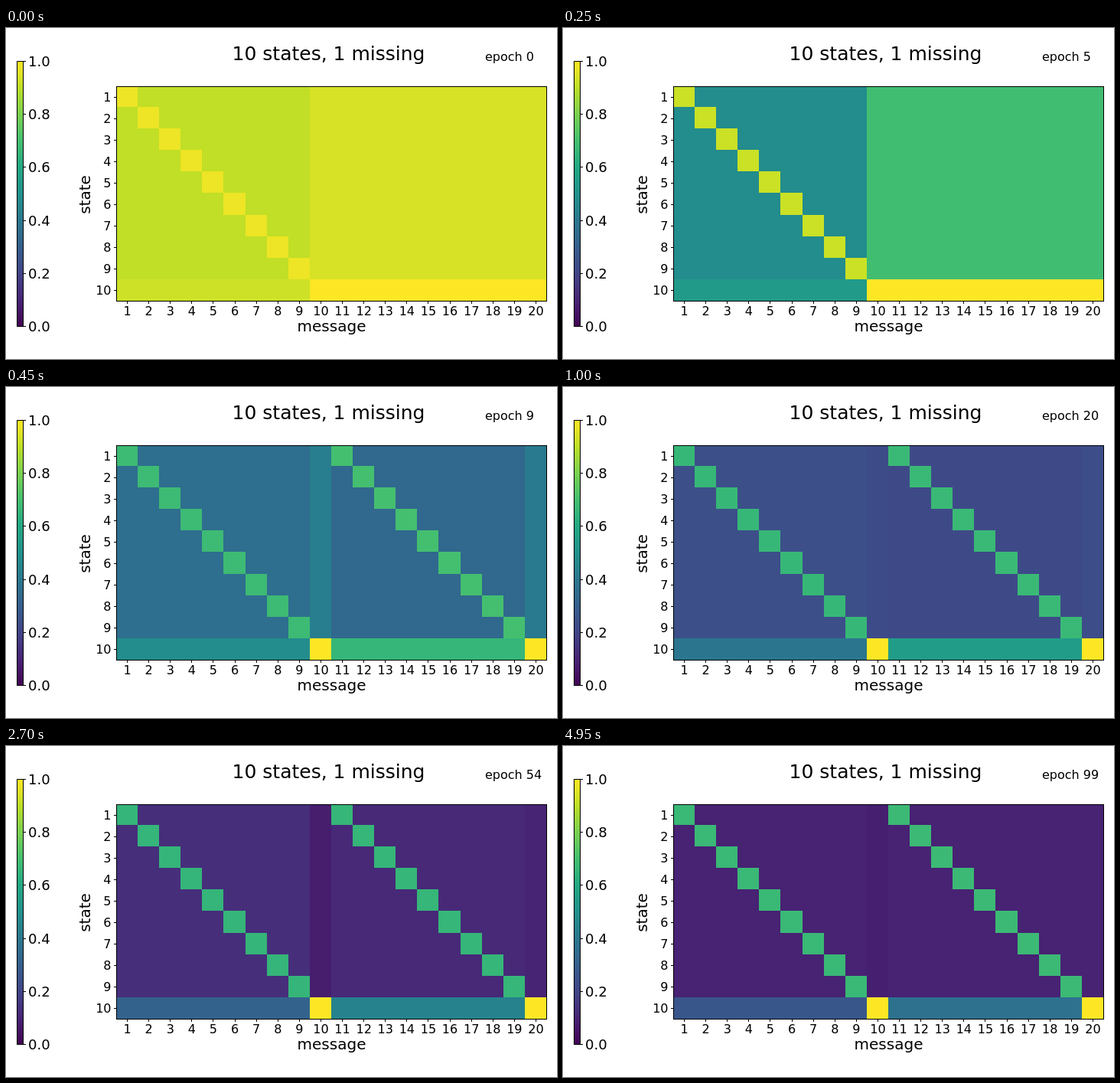
Write an HTML page with a canvas that moves like this. It is 720x432 px and loops after 5000 ms.

```html
<!DOCTYPE html>
<html lang="en">
<head>
<meta charset="utf-8">
<title>10 states, 1 missing</title>
<style>
  html, body { margin: 0; width: 100%; height: 100%; overflow: hidden; background: #fff; }
  canvas { display: block; width: 720px; height: 432px; }
</style>
</head>
<body>
<canvas id="stage" width="720" height="432"></canvas>
<script>
const ctx = document.getElementById('stage').getContext('2d');
const LOOP = 5000, STEP = 50;
const ROWS = 10, COLS = 20, CELL = 28.1;
const BOX = { left: 144, top: 76, right: 706, bottom: 356 };
const BAR = { left: 14, top: 43, right: 22, bottom: 389 };

const VIRIDIS = ['440154', '482475', '414487', '355f8d', '2a788e', '21918c',
  '22a884', '44bf70', '7ad151', 'bddf26', 'fde725']
  .map(hex => [0, 2, 4].map(i => parseInt(hex.slice(i, i + 2), 16)));

// Value of each region of the matrix at these epochs
const EPOCHS = [0, 3, 5, 9, 37, 71, 99];
const CURVES = {
  leftRest:     [.905, .65, .48, .36, .148, .118, .094],
  leftDiagonal: [.975, .94, .92, .68, .65, .66, .67],
  leftBottom:   [.925, .69, .54, .485, .318, .315, .265],
  column10:     [.94, .78, .69, .425, .075, .083, .086],
  column20:     [.94, .78, .69, .41, .10, .102, .093],
  rightRest:    [.94, .78, .69, .335, .135, .10, .094],
  rightDiagonal:[.94, .78, .69, .70, .65, .665, .675],
  rightBottom:  [1, 1, 1, .66, .46, .425, .37],
  corner:       [1, 1, 1, 1, 1, 1, 1]
};

function color(value) {
  const p = Math.min(Math.max(value, 0), 1) * 10;
  const i = Math.min(Math.floor(p), 9);
  const rgb = VIRIDIS[i].map((c, k) => Math.round(c + (VIRIDIS[i + 1][k] - c) * (p - i)));
  return `rgb(${rgb})`;
}

// Linear during the fast start, logarithmic in the slow tail
function sample(curve, epoch) {
  let i = 0;
  while (i < EPOCHS.length - 2 && epoch >= EPOCHS[i + 1]) i++;
  const scale = EPOCHS[i] >= 9 ? Math.log : x => x;
  const from = scale(EPOCHS[i]), to = scale(EPOCHS[i + 1]);
  const k = (scale(epoch) - from) / (to - from);
  return curve[i] + (curve[i + 1] - curve[i]) * k;
}

function region(row, col) {
  const bottom = row === ROWS - 1;
  if (col === 9 || col === 19) return bottom ? 'corner' : 'column' + (col + 1);
  const side = col < 9 ? 'left' : 'right';
  if (bottom) return side + 'Bottom';
  return side + (col % 10 === row ? 'Diagonal' : 'Rest');
}

function text(str, x, y, size, align = 'left') {
  ctx.font = `${size}px "DejaVu Sans", sans-serif`;
  ctx.textAlign = align;
  ctx.fillText(str, x, y);
}

function frame({ left, top, right, bottom }) {
  ctx.strokeRect(left + .5, top + .5, right - left, bottom - top);
}

function drawMatrix(epoch) {
  const fills = {};
  for (const name in CURVES) fills[name] = color(sample(CURVES[name], epoch));
  const edgeX = i => Math.round(143.9 + CELL * i);
  const edgeY = i => Math.round(74.9 + CELL * i);
  for (let row = 0; row < ROWS; row++) {
    for (let col = 0; col < COLS; col++) {
      const x = edgeX(col), y = Math.max(edgeY(row), BOX.top);
      ctx.fillStyle = fills[region(row, col)];
      ctx.fillRect(x, y, edgeX(col + 1) - x, edgeY(row + 1) - y);
    }
  }
}

function drawAxes() {
  ctx.fillStyle = ctx.strokeStyle = '#000';
  ctx.lineWidth = 1;
  frame(BOX);
  for (let col = 0; col < COLS; col++) {
    const x = 144.5 + CELL * (col + .5);
    ctx.fillRect(Math.floor(x), BOX.bottom + 1, 1, 3);
    text(col + 1, x, 375, 16, 'center');
  }
  for (let row = 0; row < ROWS; row++) {
    const y = Math.floor(76.4 + 28 * (row + .5));
    ctx.fillRect(BOX.left - 3, y, 3, 1);
    text(row + 1, 137.5, y + 6, 16, 'right');
  }
  text('message', 425.5, 396, 20, 'center');
  ctx.save();
  ctx.translate(110, 217.5);
  ctx.rotate(-Math.PI / 2);
  text('state', 0, 0, 20, 'center');
  ctx.restore();
}

function drawColorbar() {
  const height = BAR.bottom - BAR.top;
  for (let y = 0; y <= height; y++) {
    ctx.fillStyle = color(1 - y / height);
    ctx.fillRect(BAR.left, BAR.top + y, BAR.right - BAR.left + 1, 1);
  }
  ctx.fillStyle = ctx.strokeStyle = '#000';
  frame(BAR);
  for (let i = 0; i <= 5; i++) {
    const y = Math.round(BAR.bottom - height * i / 5);
    ctx.fillRect(BAR.right + 1, y, 3, 1);
    text((i / 5).toFixed(1), 29, y + 7, 18);
  }
}

function draw(time) {
  const epoch = Math.floor((time % LOOP) / STEP);
  ctx.fillStyle = '#fff';
  ctx.fillRect(0, 0, 720, 432);
  drawMatrix(epoch);
  drawAxes();
  drawColorbar();
  text('10 states, 1 missing', 421.5, 42, 25, 'center');
  text('epoch ' + epoch, 626, 43, 16);
}

const start = performance.now();
function tick() {
  draw(performance.now() - start);
  requestAnimationFrame(tick);
}
tick();
</script>
</body>
</html>
```
